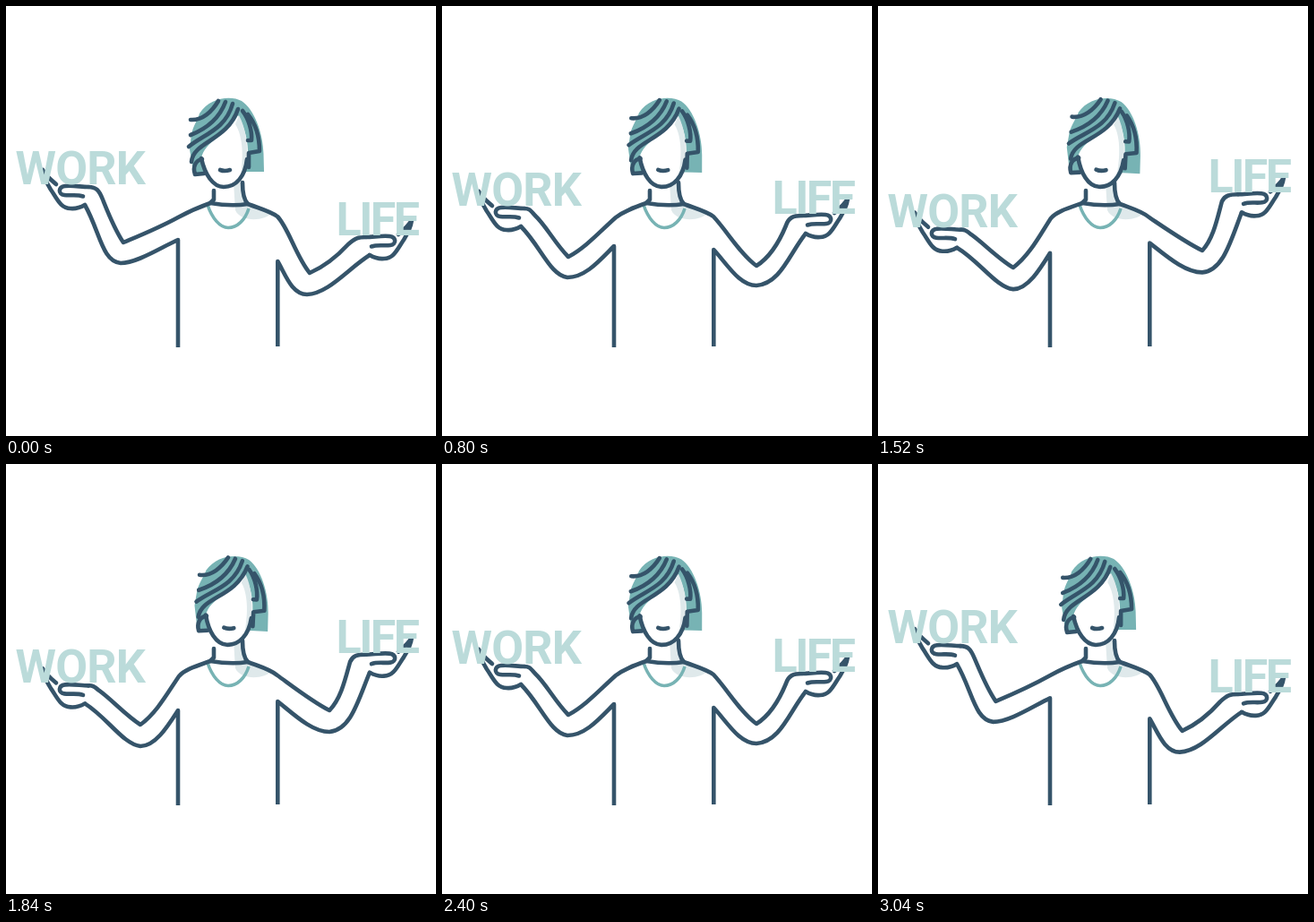
These frames come from a looping animation (480x480 px, 3.12 s). An HTML page:

```html
<!DOCTYPE html>
<html lang="en">
<head>
<meta charset="utf-8">
<title>Work and life in balance</title>
<style>
  html, body { margin: 0; width: 100%; height: 100%; overflow: hidden; background: #fff; }
  svg { display: block; width: 100%; height: 100%; }
  .ink { fill: none; stroke: #35546a; stroke-width: 4.6; stroke-linecap: round; stroke-linejoin: round; }
  .teal { fill: #77b3b4; }
  .shade { fill: #dfe9eb; }
  text { font: 700 52px Roboto, "Open Sans", sans-serif; fill: #bbdbda; }
</style>
</head>
<body>
<svg viewBox="0 0 480 480">
  <defs>
    <g id="hand">
      <path d="M92 202C84 202 74 200 66 201C58 202 58 210 65 211C72 212 79 210 86 212.5"/>
      <path d="M56 199C50 194 45 190 41 183C42 190 45 197 50 205C57 215 61 226 72 226C78 226.500 83 225 88 222"/>
    </g>
  </defs>

  <path class="shade" d="M254 197H265L266 214C268 222 280 226 296 231C290 240 262 242 256 228Z"/>
  <path fill="none" stroke="#77b3b4" stroke-width="3.6" d="M225 222C230 237 239 247.500 248 247.500C258 247.500 267 239 271 226"/>
  <g class="ink">
    <path d="M232 206V216L228 220C240 222 257 223 270 221C265 216 264 208 264 197"/>
    <path id="leftUpper"/><path id="leftLower" stroke-linecap="butt"/>
    <path id="rightUpper"/><path id="rightLower" stroke-linecap="butt"/>
    <use id="leftHand" href="#hand"/><use id="rightHand" href="#hand"/>
  </g>

  <g id="head">
    <path class="teal" d="M210 190L205 160L207 143C209 134 214 127 216 120C228 101 252 100 263 106C277 115 287 142 287.500 165L288 185H269L222 188Z"/>
    <path fill="#fff" d="M218 170C222 150 246 146 259 122C266 135 271 150 270 170C268 190 256 203 243 203C230 202 222 186 218 170Z"/>
    <path class="shade" d="M260 122C267 135 270 152 269 174L262 190C265 170 265 146 256 132Z"/>
    <g class="ink">
      <path d="M218 170C222 188 231 202 243 202C257 202 267 190 269 171"/>
      <path d="M239 183Q244 185 250 183"/>
      <path d="M219 171C212 172 208 179 211 188L221 187"/>
      <path d="M264 117C271 126 275 140 274 150H270M270 121C279 132 283 147 283 162L271 164V180"/>
    </g>
    <g id="strands" class="ink">
      <path d="M206 127C219 128 230 118 237 106"/>
      <path d="M206 144C224 137 238 126 245 107"/>
      <path d="M204 157C221 143 245 138 253 109"/>
      <path d="M207 174C209 151 247 151 259 115"/>
    </g>
  </g>

  <text id="work" x="10.500" letter-spacing="-.8">WORK</text>
  <text id="life" x="368.5" letter-spacing="-2.5">LIFE</text>
</svg>
<script>
const STEP = 80, STEPS = 39, SWING = 3200, TRAVEL = 48;
const $ = id => document.getElementById(id);

// Arm outlines at three points of the swing
const KEYS = [0, 0.5, 0.946];
const ARMS = {
  leftUpper: [
    "M228 220C214 225 203 230 192 236C170 248 150 256 131 264C121 249 114 231 108 216C104 206 101 202 92 202",
    "M228 220C214 225 203 229 194 236C176 252 160 270 141 280C126 265 116 245 104 234C98 227 97 226 92 226",
    "M228 220C214 225 200 229 193 237C180 256 168 278 150 291C134 281 118 263 104 253C98 248 96 247 92 247.4"],
  leftLower: [
    "M192 381L192 261C172 270 146 287 128 287C107 285 105 252 88 222",
    "M192 381L192 268C176 284 160 303 140 303C121 301 110 268 88 246",
    "M192 381L192 275C181 292 167 315 150 315C131 313 113 283 88 267.4"],
  rightUpper: [
    "M270 221C283 226 295 229 303 235C315 247 324 280 339 298C355 291 370 279 382 266C390 259 393 258 402 258",
    "M270 221C283 226 295 229 303 235C318 251 333 277 351 290C367 280 377 262 384 245C387 236 392 234 402 234",
    "M270 221C283 226 295 229 303 236C321 249 343 266 361 275C374 262 379 239 384 221C387 214 392 212.6 402 212.6"],
  rightLower: [
    "M303.3 380L303.3 285C312 300 319 322 336 322C360 321 382 293 406 278",
    "M303.3 380L303.3 272C319 289 332 312 351 312C378 310 388 276 406 254",
    "M303.3 380L303.3 265C323 281 342 299 361 299C385 297 393 264 406 232.6"]
};

const numbers = path => path.match(/[\d.]+/g).map(Number);
const arms = Object.entries(ARMS).map(([id, poses]) =>
  ({ node: $(id), shape: poses[0], poses: poses.map(numbers) }));

// Quadratic through the three key poses
const weights = p => KEYS.map((k, i) =>
  KEYS.reduce((w, other, j) => i === j ? w : w * (p - other) / (k - other), 1));

function draw(time) {
  const t = Math.floor(time / STEP) % STEPS * STEP;
  const p = (1 - Math.cos(2 * Math.PI * t / SWING)) / 2;
  const shift = TRAVEL * p, w = weights(p);

  for (const { node, shape, poses } of arms) {
    let i = 0;
    node.setAttribute("d", shape.replace(/[\d.]+/g, () => {
      const value = poses.reduce((sum, pose, k) => sum + w[k] * pose[i], 0);
      i++;
      return value.toFixed(2);
    }));
  }
  $("leftHand").setAttribute("transform", `translate(0 ${shift})`);
  $("rightHand").setAttribute("transform", `translate(494 ${56 - shift}) scale(-1 1)`);
  $("head").setAttribute("transform", `translate(${5.5 * p} 0) rotate(${3 * p} 246 165)`);
  $("strands").setAttribute("transform", `translate(${3 * p} ${-1.5 * p})`);
  $("work").setAttribute("y", 199 + shift);
  $("life").setAttribute("y", 256 - shift);
}

const start = performance.now();
(function tick() {
  draw(performance.now() - start);
  requestAnimationFrame(tick);
})();
</script>
</body>
</html>
```
